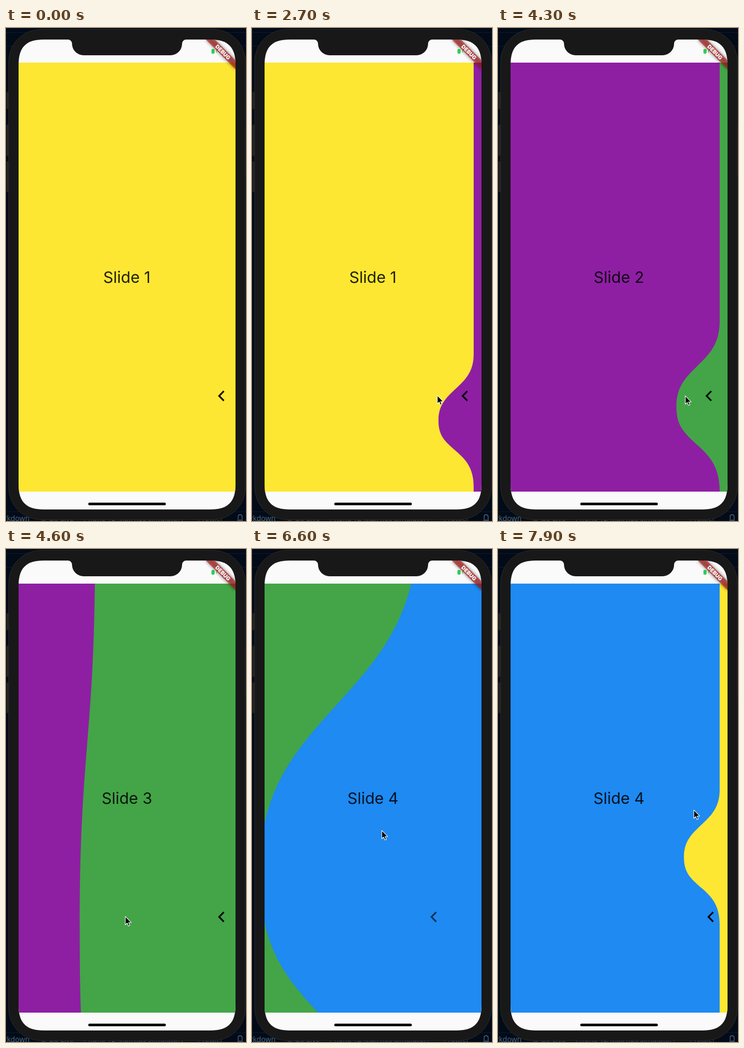
An HTML page for the animation above (8000 ms loop, 458 px wide and 940 px high).

```html
<!DOCTYPE html>
<html lang="en">
<head>
<meta charset="utf-8">
<title>Liquid swipe</title>
<style>
html, body { margin: 0; width: 100%; height: 100%; overflow: hidden; background: #020b17; }
svg { display: block; width: 458px; height: 940px; }
.label { font: 30px Inter, "Open Sans", sans-serif; text-anchor: middle; fill: rgba(0,0,0,.87); }
.status { font: 14px "Open Sans", "Noto Sans", sans-serif; fill: #4b6b88; }
</style>
</head>
<body>
<svg viewBox="0 0 458 940">
  <defs>
    <clipPath id="screen"><path id="screenPath"/></clipPath>
    <clipPath id="wave"><path id="wavePath"/></clipPath>
    <filter id="blur" x="-20%" y="-80%" width="140%" height="260%"><feGaussianBlur stdDeviation="3"/></filter>
  </defs>

  <rect width="458" height="940" fill="#020b17"/>
  <path d="M0 8.5H458M0 34.5H458M0 922.5H458" stroke="#0b1c2e"/>
  <g class="status">
    <text x="-4" y="940">rkdown</text>
    <g opacity=".6">
      <text x="66" y="940">⊘ Go Live</text>
      <text x="148" y="940">Phone 12 Max (ios simulator)</text>
      <text x="366" y="940">Prettier</text>
    </g>
  </g>

  <g fill="#242424" stroke="#0c0c0c">
    <rect x=".5" y="122" width="8" height="33" rx="1"/>
    <rect x=".5" y="184" width="8" height="60" rx="1"/>
    <rect x=".5" y="254" width="8" height="59" rx="1"/>
    <rect x="452" y="184" width="6" height="100" rx="1"/>
  </g>
  <rect x="5" y="2.5" width="452" height="935" rx="62" fill="#181818" stroke="#2b2b2b"/>
  <path d="M441.5 938.5H452M443 937V932Q443 928 446.8 928T450.6 932V937" fill="none" stroke="#4b6b88" stroke-width="1.3"/>

  <g clip-path="url(#screen)">
    <rect x="24" y="22" width="414" height="896" fill="#fafafa"/>
    <g id="under"><rect x="24" y="66" width="414" height="818"/><text class="label" x="230.7" y="486"></text></g>
    <g id="over" clip-path="url(#wave)"><rect x="24" y="66" width="414" height="818"/><text class="label" x="230.7" y="486"></text></g>
    <polyline id="chevron" points="415.7,692.4 406.8,701.5 415.7,710.6" fill="none" stroke="#000" stroke-width="3.2"/>
    <rect x="157" y="905" width="148" height="5" rx="2.5"/>
    <rect x="392" y="40" width="6" height="9" rx="2" fill="#30d158"/>
    <rect x="401" y="41" width="2" height="6" rx="1" fill="#30d158" opacity=".6"/>
    <g transform="translate(438 22) rotate(45)">
      <rect x="-40" y="28" width="80" height="12" opacity=".5" filter="url(#blur)"/>
      <rect x="-40" y="28" width="80" height="12" fill="#b71c1c" fill-opacity=".627"/>
      <text y="37.7" font-family="Inter, Roboto, sans-serif" font-weight="900" font-size="10.2" fill="#fff" text-anchor="middle">DEBUG</text>
    </g>
  </g>
  <path d="M118 21V22A8 8 0 0 1 126 30A22 22 0 0 0 148 52H314A22 22 0 0 0 336 30A8 8 0 0 1 344 22V21Z" fill="#181818"/>

  <path id="cursor" d="M0 0V15.8L3.6 12.5 6 18 8.6 16.9 6.3 11.5H11.2Z" fill="#000" stroke="#fff" stroke-width="1.1" stroke-linejoin="round"/>
</svg>
<script>
const LOOP = 8000, STEP = 100;
const LEFT = 24, TOP = 66, W = 414, H = 818;
const RELEASE_AT = .4, DRAG_POWER = 2.45, SETTLE_RATE = .0011;
const $ = id => document.getElementById(id);
const COLORS = ["#fde733", "#8e1fa3", "#43a547", "#1e8af2"];

// The wave centre drifts between two heights while the finger drags
const SWIPES = [
  { start: 2600, release: 2900, from: 737, to: 572 },
  { start: 4200, release: 4436, from: 655, to: 655 },
  { start: 6200, release: 6618, from: 548, to: 548 },
  { start: 7800, release: 8094, from: 521, to: 521 }
];

// Where the pointer turns: time, x, y
const POINTER = [
  [0, 470, 560], [600, 215, 700], [1500, 400, 670], [2500, 425, 705],
  [2700, 353, 700], [2900, 215, 692], [3400, 340, 688], [3800, 448, 690],
  [4200, 400, 701], [4600, 227, 700], [5300, 446, 517], [6200, 446, 530],
  [6600, 247, 536], [7200, 448, 498], [7700, 451, 497], [7900, 373, 497]
];

const clamp = (v, lo = 0, hi = 1) => Math.min(hi, Math.max(lo, v));
const mix = (a, b, k) => a + (b - a) * k;

function pointerAt(t) {
  const i = clamp(POINTER.findIndex(p => p[0] > t), 1, POINTER.length - 1);
  const [a, b] = t >= LOOP - STEP ? [POINTER.at(-1), POINTER.at(-1)] : [POINTER[i - 1], POINTER[i]];
  const k = a === b ? 0 : (t - a[0]) / (b[0] - a[0]);
  return [mix(a[1], b[1], k), mix(a[2], b[2], k)];
}

// Smooth display corners: each side starts bending at reach, with its handle at pull
function screenPath(x, y, w, h, reach = 48, pull = 14.4) {
  const r = x + w, b = y + h;
  return `M${x + reach} ${y}H${r - reach}C${r - pull} ${y} ${r} ${y + pull} ${r} ${y + reach}` +
    `V${b - reach}C${r} ${b - pull} ${r - pull} ${b} ${r - reach} ${b}` +
    `H${x + reach}C${x + pull} ${b} ${x} ${b - pull} ${x} ${b - reach}` +
    `V${y + reach}C${x} ${y + pull} ${x + pull} ${y} ${x + reach} ${y}Z`;
}

// Depth grows with the drag, then rings out like a damped spring
function waveDepth(p) {
  if (p <= .4) return mix(48, W * .8, p / .4);
  if (p >= 1) return 0;
  const s = (p - .4) / .6, beta = 40 / 19.6, omega = Math.sqrt((50 / 9.8) ** 2 - beta ** 2);
  return W * .8 * Math.exp(-beta * s) * Math.cos(omega * s);
}

function wavePath(p, center) {
  const edge = LEFT + W - mix(15, W, clamp((p - .2) / .6));
  const radius = mix(82, H * .9, clamp(p / .4));
  const depth = waveDepth(p), y = TOP + center;
  // u: depth from the edge, v: height above the centre in radii
  const at = (u, v) => `${(edge - depth * u).toFixed(2)} ${(y - radius * v).toFixed(2)} `;
  return `M-600 -900V1900H${edge}V${y + radius}` +
    "C" + at(0, -.71) + at(.245, -.583) + at(.501, -.465) +
    "C" + at(.839, -.309) + at(1, -.23) + at(1, 0) +
    "C" + at(1, .228) + at(.786, .338) + at(.529, .467) +
    "C" + at(.235, .613) + at(0, .731) + at(0, 1) + "V-900Z";
}

function setPage(group, index) {
  const n = index % COLORS.length;
  group.firstElementChild.setAttribute("fill", COLORS[n]);
  group.lastElementChild.textContent = "Slide " + (n + 1);
}

function render(t) {
  const page = Math.max(0, SWIPES.filter(s => s.start <= t).length - 1);
  const { start, release, from, to } = SWIPES[page];
  const k = clamp((t - start) / (release - start));
  const pulled = RELEASE_AT * k ** DRAG_POWER;
  const p = Math.min(1, pulled + Math.max(0, t - release) * SETTLE_RATE);

  setPage($("over"), page);
  setPage($("under"), page + 1);
  $("wavePath").setAttribute("d", p > 0 ? wavePath(p, mix(from, to, k)) : "M0 0H458V940H0Z");

  const pull = k < 1 ? pulled : 0;
  $("chevron").setAttribute("transform", `translate(${-pull * 179} 0)`);
  $("chevron").setAttribute("opacity", 1 - pull);
  const [x, y] = pointerAt(t);
  $("cursor").setAttribute("transform", `translate(${x + .7} ${y + .7})`);
}

$("screenPath").setAttribute("d", screenPath(24, 22, W, 896));
const origin = performance.now();
function tick() {
  const t = (performance.now() - origin) % LOOP;
  render(Math.floor(t / STEP) * STEP);
  requestAnimationFrame(tick);
}
tick();
</script>
</body>
</html>
```
